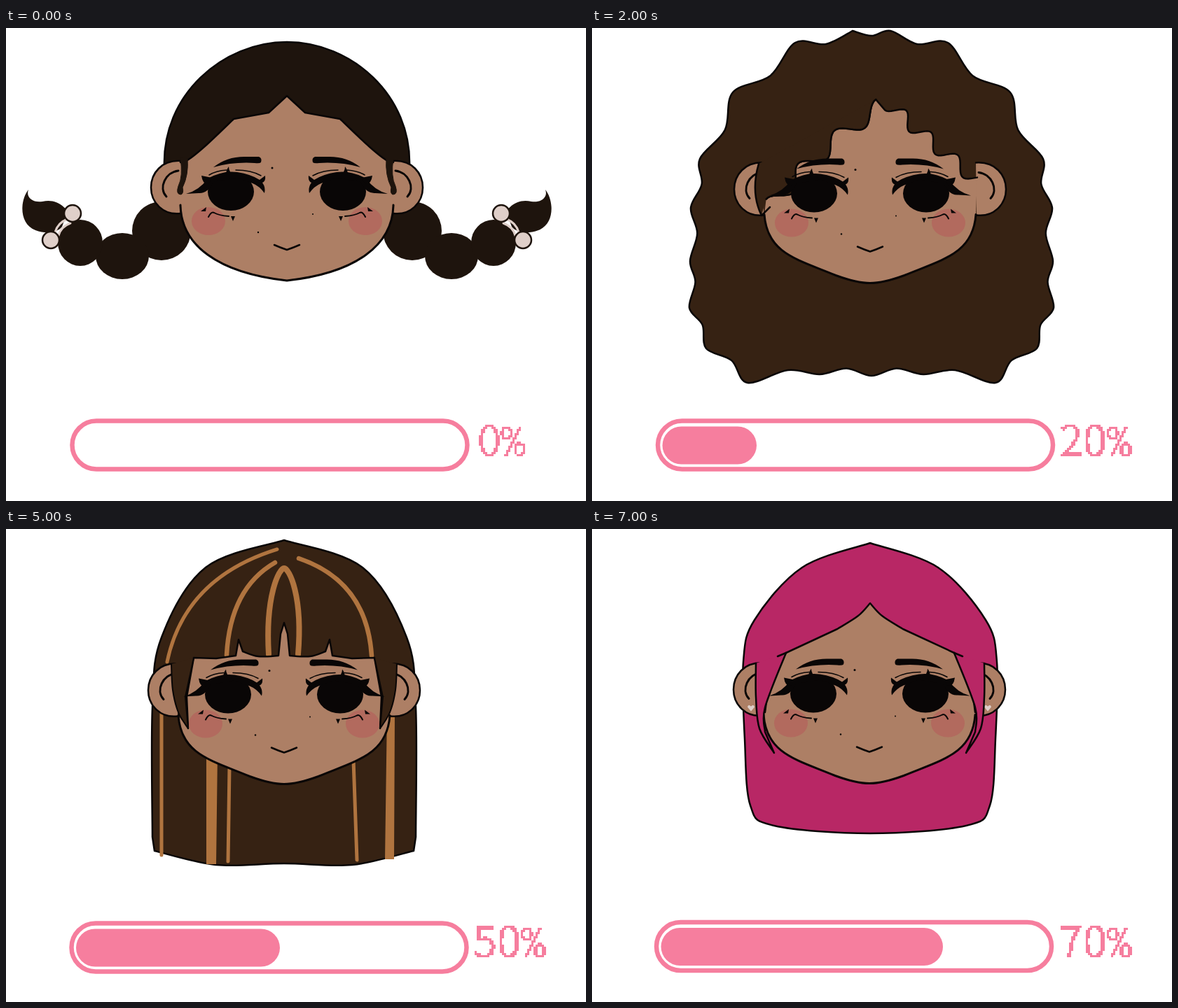
These frames come from a looping animation (828 by 676 pixels, 8000 ms). An HTML page:

```html
<!DOCTYPE html>
<html lang="en">
<head>
<meta charset="utf-8">
<title>Hair loading bar</title>
<style>
  html, body { margin: 0; width: 100%; height: 100%; overflow: hidden; background: #fff; }
  svg { display: block; width: 828px; height: 676px; }
  text { font: 500 62px "Noto Sans CJK JP", "Noto Sans CJK SC", Roboto, sans-serif; text-anchor: middle; fill: #f67e9e; }
  .percent { font: 500 60px "Noto Sans Mono", "Liberation Mono", monospace; }
</style>
</head>
<body>
<svg viewBox="0 0 828 676">
  <!-- Samples the lettering once per cell and grows each sample to a block. -->
  <filter id="pixels" filterUnits="userSpaceOnUse" x="660" y="555" width="120" height="70" color-interpolation-filters="sRGB">
    <feFlood x="661" y="556" width="1" height="1"/>
    <feComposite in2="SourceGraphic" operator="over" x="660" y="555" width="3" height="3"/>
    <feTile/>
    <feComposite in="SourceGraphic" operator="in"/>
    <feComponentTransfer><feFuncA type="discrete" tableValues="0 1"/></feComponentTransfer>
    <feMorphology operator="dilate" radius="1"/>
  </filter>
  <g id="stage"></g>
</svg>
<script>
const SKIN = '#ad7f65', INK = '#090606', PINK = '#f67e9e', GOLD = '#b0743f', BEAD = '#dfcfc9';
const DARK = '#1e140d', BROWN = '#362213', MAGENTA = '#b82765';

// Points are written "x,y x,y"; a slash marks a corner between two smooth runs.
const parse = text => text.trim().split(' ').map(s => s.split(',').map(Number));
const mapPoints = (text, fn) => text.replace(/([\d.]+),([\d.]+)/g, (_, x, y) => fn(+x, +y).join());
const mirror = (text, axis) => mapPoints(text.split(' ').reverse().join(' '), (x, y) => [2 * axis - x, y]);
const symmetric = (half, axis, cusp) => cusp
  ? `${half} / ${mirror(half, axis)}`
  : `${half} ${mirror(half, axis).split(' ').slice(1).join(' ')}`;

function smoothRun(p, start) {
  let d = start + p[0];
  for (let i = 0; i < p.length - 1; i++) {
    const a = p[i - 1] || p[i], b = p[i], c = p[i + 1], e = p[i + 2] || c;
    d += `C${b.map((v, k) => v + (c[k] - a[k]) / 6)} ${c.map((v, k) => v - (e[k] - b[k]) / 6)} ${c}`;
  }
  return d;
}
const smooth = text => text.split('/').map((run, i) => smoothRun(parse(run), i ? 'L' : 'M')).join('');

// Closed outline through bump tips, with a dip toward the middle after each tip.
function bumpy(half, axis, middleY, depth) {
  const tips = parse(symmetric(half, axis)), outline = [];
  tips.forEach((a, i) => {
    const b = tips[(i + 1) % tips.length];
    const x = (a[0] + b[0]) / 2, y = (a[1] + b[1]) / 2;
    const dip = depth * Math.hypot(b[0] - a[0], b[1] - a[1]) / Math.hypot(axis - x, middleY - y);
    outline.push(a, [x + (axis - x) * dip, y + (middleY - y) * dip]);
  });
  return smoothRun([...outline, tips[0]], 'M');
}

// Closed chain of arcs between cusps, bulging most at the sides.
function scallops(half, axis) {
  const p = parse(symmetric(half, axis));
  return 'M' + p[0] + p.slice(1).map((q, i) => {
    const bulge = 0.22 + 0.18 * Math.sin(2 * Math.PI * i / (p.length - 2)) ** 2;
    const r = Math.hypot(q[0] - p[i][0], q[1] - p[i][1]) * (bulge / 2 + 1 / (8 * bulge));
    return `A${r} ${r} 0 0 0 ${q}`;
  }).join('');
}

// A quadratic curve with a cosine ripple across it.
function ripple(text, waves, height, start = 'M') {
  const [a, b, c] = parse(text), points = [];
  for (let i = 0; i <= 60; i++) {
    const t = i / 60, s = 1 - t;
    const [x, y] = [0, 1].map(k => s * s * a[k] + 2 * s * t * b[k] + t * t * c[k]);
    const [dx, dy] = [0, 1].map(k => s * (b[k] - a[k]) + t * (c[k] - b[k]));
    const shift = -height * Math.cos(2 * Math.PI * waves * t) / Math.hypot(dx, dy);
    points.push([x - dy * shift, y + dx * shift]);
  }
  return start + points.join('L');
}

const path = (d, fill = INK, stroke = 'none', width = 2.5) =>
  `<path d="${d}" fill="${fill}" stroke="${stroke}" stroke-width="${width}" stroke-linejoin="round" stroke-linecap="round"/>`;
const line = (d, width = 2.5, color = INK) => path(d, 'none', color, width);
const ellipse = (x, y, rx, ry, fill, stroke = 'none') =>
  `<ellipse cx="${x}" cy="${y}" rx="${rx}" ry="${ry}" fill="${fill}" stroke="${stroke}" stroke-width="2.5"/>`;
const both = (content, axis = 401) => `${content}<g transform="matrix(-1 0 0 1 ${2 * axis} 0)">${content}</g>`;
const move = (x, y, content) => `<g transform="translate(${x} ${y})">${content}</g>`;
const strand = (width, text, waves, height) => line(ripple(text, waves, height), width, GOLD);
const curl = (d, width) => line(d, width + 4) + line(d, width, BROWN);

const features = both(
  ellipse(289, 276, 24, 20, '#b26a5e') +
  ellipse(321, 234, 33, 27, INK) +
  path('M257,237Q276,232 288,215Q310,203 330,206Q350,209 362,217L370,211Q371,219 366,221Q371,228 369,236Q362,226 352,222L330,214 296,220Q288,237 275,236Z') +
  path('M279,211Q281,225 290,222L294,214ZM318,198Q312,206 316,212H326Q318,206 318,198Z') +
  line('M290,210Q300,204 315,203M328,203Q350,203 364,211', 1.5) +
  path('M296,199Q315,184 340,184H361Q366,186 364,192Q362,194 355,193Q325,191 296,199Z') +
  line('M289,270Q293,262 297,264Q304,268 318,269', 2) +
  path('M278,262L286,256 285,262ZM321,269L327,269 324,276Z')
) + line('M383,310Q392,314 401,317Q410,314 419,310') +
  ellipse(380, 200, 1.5, 1.5, INK) + ellipse(360, 292, 1.2, 1.2, INK) + ellipse(438, 266, 1, 1, INK);

const ear = path('M250,190C222,188 207,208 207,228C207,250 225,268 249,265', SKIN, INK) +
  line('M246,204C228,206 217,228 229,241', 3);
const heart = path('M232,259L227,253Q228,248 232,252Q236,248 237,253Z', BEAD);

// Jaws run from the right ear to the left one.
const roundJaw = 'M553,253C552,310 500,350 401,361C302,350 250,310 249,253';
const pointedJaw = 'M552,264C548,320 505,328 450,351Q420,362 401,362Q382,362 352,351C297,328 254,320 250,264';

const braid = ellipse(222, 290, 42, 42, DARK) + ellipse(166, 326, 38, 33, DARK) + ellipse(106, 307, 32, 33, DARK) +
  path('M32,231C20,246 18,280 42,289C58,295 74,292 80,284L88,262C78,249 66,245 52,248C38,250 28,242 32,231Z', DARK) +
  line('M70,292Q74,278 88,273M75,297Q78,284 92,279', 3, BEAD) +
  ellipse(95, 265, 12, 12, BEAD, DARK) + ellipse(64, 303, 12, 12, BEAD, DARK);

const braids = {
  at: [0, 0], hair: DARK, jaw: roundJaw,
  back: 'M226,200C222,95 310,20 401,20S580,95 576,200Z',
  extra: both(braid),
  hairline: smooth(symmetric('249,192 259,189 284,169 325,130 / 375,121 401,97', 401, true)),
  locks: both(path('M249,186Q253,212 246,226Q242,238 250,238Q254,236 252,228Q261,210 259,186Z', DARK, DARK, 1))
};

// A curly fringe: its left part also falls over the ear.
function curlyFringe(left, right) {
  const edge = ripple(...left), side = 'M238,194Q226,235 242,268';
  return {
    hair: BROWN, hairline: edge + ripple(...right, 'L'),
    locks: path(edge + side.replace('M', 'L') + 'Z', BROWN) + line(edge) + line(side + 'L254,256')
  };
}

const longCurls = {
  ...curlyFringe(['262,250 345,190 408,110', 4, 6], ['416,112 470,135 548,222', 4.3, -6]),
  at: [-3, 4.5], locksOnTop: true,
  back: bumpy('372,4 290,21 201,92 154,187 141,257 140,333 139,400 163,458 222,507 325,495 399,497', 399, 255, 0.13)
};

const shortCurls = {
  ...curlyFringe(['258,252 320,175 412,112', 3, 12], ['425,110 480,160 548,216', 3.3, -10]),
  at: [-4, 2.5],
  back: bumpy('372,5 275,35 188,138 151,253 158,368 275,425 397,437', 397, 230, 0.11)
};

function bigCurlStrands() {
  let out = strand(7, '155,118 80,270 168,417', 2.7, -14) +
    strand(4.5, '280,56 95,232 210,408', 3.2, -22) +
    strand(3, '537,54 610,90 636,160', 1, -7) +
    strand(5, '615,156 620,290 636,437', 3.3, 16) +
    strand(7, '690,229 682,300 680,367', 1.3, 14);
  for (let i = 0; i < 5; i++) {
    const x = 245 + 81 * i, reach = (x - 401) ** 2;
    const top = 372 - reach / 290, bottom = 486 - reach / 850;
    out += strand(i % 2 ? 7 : 4, `${x},${top} ${x},${(top + bottom) / 2} ${x},${bottom}`, 2.2, x < 401 ? -15 : 15);
  }
  return out + both(line('M248,145Q290,80 372,69M254,185Q300,105 385,95', 2.5, GOLD), 400);
}

const bigCurls = {
  at: [-1, 4], hair: BROWN,
  back: scallops('396,11 302,31 210,73 134,128 116,196 95,295 130,401 193,434 278,455 356,470', 400) + 'Z',
  extra: path('M318,62C325,35 365,22 400,22S475,35 481,62L480,66C450,48 425,42 400,42S350,48 319,66Z') + bigCurlStrands(),
  hairline: smooth(symmetric('249,205 262,188 300,157 345,134 / 366,138 / 371,126 400,119', 400)),
  locks: both(curl('M362,132Q343,138 348,150Q353,167 337,164', 7) + curl('M246,200Q240,214 247,224Q237,234 245,244', 6), 400)
};

const fringe = {
  at: [-4, 2.5], hair: BROWN,
  back: smooth(symmetric('397,16 285,55 222,155 209,255 209,440 / 212,460 300,480 397,478', 397)),
  extra: line('M222,262V466M387,29Q255,70 230,190', 5, GOLD) +
    line('M319,340L317,475M496,330L501,473', 5, GOLD) +
    line('M384,48Q320,85 315,180M418,42Q515,75 522,181', 6.5, GOLD) +
    line('M375,179C370,95 390,56 397,56S424,95 417,179', 8, GOLD) +
    path('M286,320H302L300,479H286ZM544,260H555L554,472H541Z', GOLD),
  hairline: smooth(symmetric('260,285 / 258,240 268,184 / 300,185 328,181 / 332,158 / 338,175 360,182 389,181 / 392,150 397,134', 397, true)),
  locks: both(path(smooth('236,193 238,230 246,262 260,285 / 256,240 268,184'), BROWN, INK, 2), 397)
};

const straight = (hair, earring) => ({
  at: [-5, 1.5], hair, earring,
  back: smooth(symmetric('397,20 300,55 232,130 216,190 218,300 226,395 260,424 397,435', 397)),
  hairline: smooth(symmetric('247,262 255,215 277,177 / 350,143 380,124 397,106', 397, true)),
  locks: both(path(smooth('234,192 234,240 239,285 260,320 / 247,290 247,255 277,177'), hair, INK) +
    line('M265,182L277,177'), 397)
});

// Each step: hairstyle, label, right end of the fill, bar offset.
const steps = [
  [braids, '0', 0, 0, 0],
  [longCurls, '10', 195, -1.5, 0],
  [{ ...shortCurls, back: longCurls.back }, '20', 235, -0.5, 0],
  [shortCurls, '30', 276, 0.5, 0.5],
  [bigCurls, '40', 360, 0, 0],
  [fringe, '50', 391, -1, 2],
  [straight(BROWN, ''), '60', 446, -1, 0.5],
  [straight(MAGENTA, heart), '70', 501, -2.5, 0.5]
];

function drawHead({ at, hair, back, extra = '', hairline, jaw = pointedJaw, locks, locksOnTop, earring = '' }) {
  const chin = mapPoints(jaw, (x, y) => [x + at[0], y + at[1]]);
  const face = move(...at, features);
  return path(back, hair, INK) + extra +
    move(...at, both(ear + earring)) +
    path(hairline + chin.replace('M', 'L') + 'Z', SKIN) +
    line(hairline) + line(chin, 3) +
    (locksOnTop ? face + locks : locks + face);
}

function drawBar(label, end, dx, dy) {
  const left = 101 + dx, box = (x, y, width, height, style) =>
    `<rect x="${x}" y="${y}" width="${width}" height="${height}" rx="${height / 2}" ${style}/>`;
  const [digits, percent] = label.length > 1 ? ['684 718', 752.5] : ['690', 724];
  return box(94.5 + dx, 561.5 + dy, 564, 69, `fill="none" stroke="${PINK}" stroke-width="6.5"`) +
    (end ? box(left, 569.5 + dy, end - left, 54, `fill="${PINK}"`) : '') +
    `<text y="612" filter="url(#pixels)"><tspan x="${digits}">${label}</tspan><tspan class="percent" x="${percent}">%</tspan></text>`;
}

const scenes = steps.map(([head, ...bar]) => drawHead(head) + drawBar(...bar));
const stage = document.getElementById('stage');
const begin = performance.now();
let shown = -1;

function tick() {
  const step = Math.floor((performance.now() - begin) / 1000) % scenes.length;
  if (step !== shown) stage.innerHTML = scenes[shown = step];
  requestAnimationFrame(tick);
}
tick();
</script>
</body>
</html>
```
